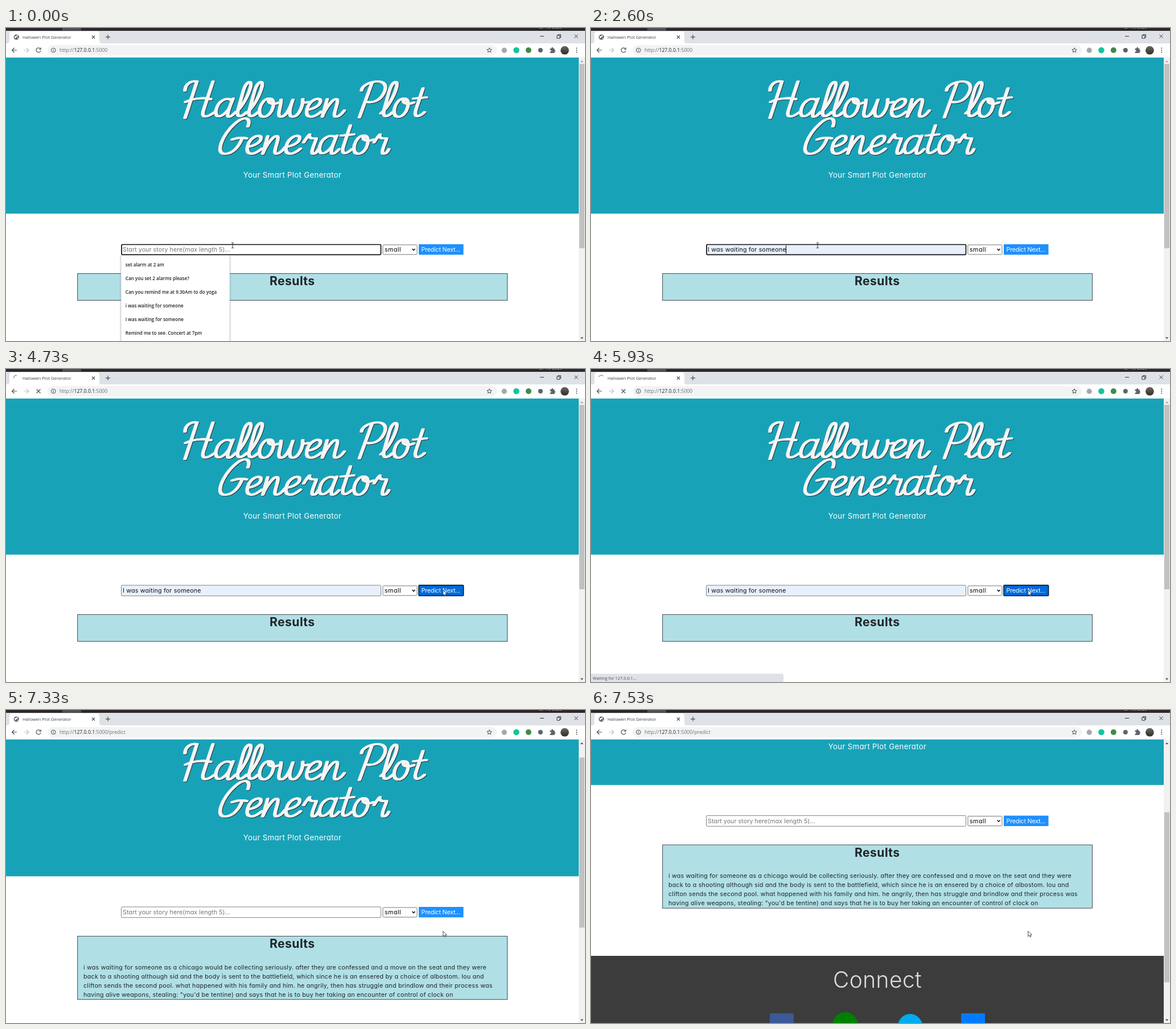
Animation, 1017 px wide and 550 px high, one loop 8000 ms. Source, as an HTML page:

```html
<!DOCTYPE html>
<html lang="en">
<head>
<meta charset="utf-8">
<title>Hallowen Plot Generator</title>
<style>
html, body { margin: 0; width: 100%; height: 100%; overflow: hidden; background: #fff; }
svg { display: block; width: 1017px; height: 550px; }
text { white-space: pre; }
.ui { font-family: "Open Sans", "Noto Sans", sans-serif; }
.web { font-family: Inter, Roboto, sans-serif; font-feature-settings: "cv11"; font-size: 10.7px; letter-spacing: .23px; fill: #212529; }
.list { font: 600 8.1px "Open Sans", "Noto Sans", sans-serif; fill: #222; }
.line { fill: none; stroke: #4a4d51; stroke-width: 1.2; }
.script { fill: none; stroke: #f5f5f5; stroke-width: 3.7; stroke-linecap: round; stroke-linejoin: round; filter: drop-shadow(1.3px 1.3px 0 #2b3d42); }
</style>
</head>
<body>
<svg viewBox="0 0 1017 550" xmlns="http://www.w3.org/2000/svg">
  <defs>
    <clipPath id="view"><rect y="51.5" width="1006" height="498.5"/></clipPath>
    <linearGradient id="face" x2="0" y2="1"><stop stop-color="#6b6a5c"/><stop offset="1" stop-color="#2f2b2a"/></linearGradient>
  </defs>
  <rect width="1017" height="550" fill="#fff"/>

  <g clip-path="url(#view)">
    <g id="page">
      <rect y="51.5" width="1006" height="274.7" fill="#18a2b8"/>
      <g id="title" class="script" role="img" aria-label="Hallowen Plot Generator"></g>
      <text class="web" x="503" y="263" text-anchor="middle" style="font-size:13.24px;letter-spacing:.32px;fill:#fff">Your Smart Plot Generator</text>

      <rect id="field" rx="1.5"/>
      <text id="value" class="web" x="205" y="393" xml:space="preserve"></text>
      <rect id="caret" y="382" width="1" height="14.5" fill="#000"/>

      <rect x="662" y="381" width="60" height="17" rx="1.5" fill="#fff" stroke="#767676"/>
      <text class="web" x="665" y="393" style="letter-spacing:.45px;fill:#000">small</text>
      <path d="M713.5 388l2.5 2.6 2.5-2.6" fill="none" stroke="#111" stroke-width="1.5"/>

      <rect id="ring" x="723.8" y="378.8" width="81" height="21" rx="2" fill="#8fc3f5"/>
      <rect id="button" x="725" y="380" width="78.5" height="18.4"/>
      <text class="web" x="729.5" y="393" style="letter-spacing:-.2px;fill:#fff">Predict Next...</text>

      <rect id="box" x="125.7" y="431.4" width="754.8" fill="#b0e0e6" stroke="#343a40" stroke-width=".9"/>
      <text class="web" x="502.8" y="452" text-anchor="middle" style="font-size:21.2px;letter-spacing:.4px;font-weight:700">Results</text>
      <g id="story" class="web"></g>

      <g id="footer">
        <rect y="626.4" width="1006" height="240" fill="#3c3c3c"/>
        <text class="web" x="503" y="682.8" text-anchor="middle" style="font-size:39px;font-weight:300;fill:#dcdcdc;letter-spacing:.4px">Connect</text>
        <rect x="314" y="727.5" width="42" height="42" rx="2" fill="#3b5998"/>
        <circle cx="446.5" cy="748" r="22.5" fill="#008000"/>
        <circle cx="560.5" cy="750" r="21.5" fill="#00acee"/>
        <rect x="650" y="727.5" width="42" height="42" rx="2" fill="#007bff"/>
      </g>
    </g>
    <g id="menu">
      <rect id="panel" x="202" y="399.5" fill="#fff" stroke="#d0d0d0" stroke-width=".7" rx="1" style="filter:drop-shadow(0 1px 1.5px #0005)"/>
      <rect id="mark" x="202.4" width="126.6" height="24" fill="#e8e8e8"/>
      <g id="items" class="list"></g>
    </g>
  </g>

  <rect x="1006" y="51.5" width="11" height="498.5" fill="#f1f1f1"/>
  <rect id="thumb" x="1007" width="9" fill="#c1c1c1"/>
  <path id="up" d="M1008.8 60h5.4l-2.7-3z"/>
  <path d="M1008.8 543.5h5.4l-2.7 3z" fill="#505050"/>

  <g class="ui">
    <rect width="1017" height="5" fill="#2d282c"/>
    <rect x="99" width="33" height="4.5" fill="#555054"/>
    <text x="937" y="1.2" font-size="7.6" fill="#ddd">27-10-2020</text>
    <rect y="5" width="1017" height="22" fill="#dee1e6"/>
    <path d="M2 27q4 0 4-4V11q0-5 5-5H159q5 0 5 5v12q0 4 4 4z" fill="#fff"/>
    <rect y="27" width="1017" height="24.5" fill="#fff"/>
    <g id="globe">
      <circle cx="18.3" cy="16" r="4.6" fill="#505458"/>
      <path d="M15 14l3 .3 1-2 2 1-1 2.3-2.5 1-.5 2.4-1.6-2zM20 17l2-.5-.8 2-1.6 1z" fill="#fff"/>
    </g>
    <path id="spin" fill="none" stroke-width="1.3" stroke-linecap="round"/>
    <text x="29" y="18.7" font-size="7.47" fill="#3c4043">Hallowen Plot Generator</text>
    <path class="line" d="M151 13.5l5 5m0-5l-5 5M175 15.8h8m-4-4v8"/>
    <path class="line" d="M938 14.5h7M967.8 13.2h5v5h-5zM969.4 13v-1.4h5v5h-1.4M998.5 11.5l6 6m0-6l-6 6" style="stroke:#222;stroke-width:.9"/>
    <path class="line" d="M19 39h-8.4m4-4l-4 4 4 4"/>
    <path class="line" d="M31.5 39h8.4m-4-4l4 4-4 4" style="stroke:#bdc1c6"/>
    <path id="reload" class="line" d="M60.2 36.4a4 4 0 1 0 .8 3.4M61.2 34.6v2.9h-3"/>
    <path id="stop" class="line" d="M53.5 35.5l7 7m0-7l-7 7"/>
    <rect x="73" y="30" width="789" height="18" rx="9" fill="#f1f3f4"/>
    <circle cx="83.3" cy="39" r="3.8" class="line" style="stroke-width:1"/>
    <path class="line" d="M83.3 38.5v2.6m0-4.2v1" style="stroke-width:1"/>
    <text x="94" y="42.2" font-size="8.68" fill="#6b7075" xml:space="preserve">http://<tspan fill="#202124">127.0.0.1</tspan>:5000<tspan id="path"></tspan></text>
    <path class="line" style="stroke-width:1" d="M849 34.8l1.2 2.8 3 .2-2.3 2 .7 2.9-2.6-1.6-2.6 1.6.7-2.9-2.3-2 3-.2z"/>
    <circle cx="875.2" cy="39.2" r="4.6" fill="#a4a8ac"/>
    <circle cx="896.4" cy="39" r="5.3" fill="#15c39a"/>
    <circle cx="917.8" cy="39" r="5" fill="#3f8a4a"/>
    <circle cx="938.8" cy="39" r="4" fill="#5f6368"/>
    <path d="M955.5 36h2.6a1.6 1.6 0 1 1 3 0h2.4v2.7a1.5 1.5 0 1 1 0 3V44h-8v-2.6a1.5 1.5 0 1 0 0-2.8z" fill="#5f6368"/>
    <circle cx="981.4" cy="39.2" r="7.4" fill="url(#face)"/>
    <g fill="#4a4d51"><circle cx="1002.3" cy="35.6" r="1"/><circle cx="1002.3" cy="39" r="1"/><circle cx="1002.3" cy="42.4" r="1"/></g>
    <g id="status">
      <path d="M0 535.5h335q3 0 3 3V550H0z" fill="#dee1e6"/>
      <text x="3" y="546" font-size="7.4" fill="#4a4d51">Waiting for 127.0.0.1...</text>
    </g>
  </g>

  <path id="beam" d="M-2-4.5h1.4L0-4l.6-.5H2M0-4v8M-2 4.5h1.4L0 4l.6.5H2" fill="none" stroke="#222" stroke-width=".9"/>
  <path id="arrow" d="M0 0v9.3l2.1-1.9 1.5 3.2 1.5-.7-1.4-3.1h2.9z" fill="#fff" stroke="#222" stroke-width=".8"/>
</svg>
<script>
const LOOP = 8000, FPS = 15;
const $ = id => document.getElementById(id);
const NS = 'http://www.w3.org/2000/svg';

function add(parent, tag, attrs, text) {
  const el = document.createElementNS(NS, tag);
  set(el, attrs);
  if (text) el.textContent = text;
  parent.append(el);
  return el;
}
function set(el, attrs) {
  for (const k in attrs) el.setAttribute(k, attrs[k]);
}
const show = (id, on) => { $(id).style.display = on ? '' : 'none'; };

// Upright pen strokes, baseline at 0; the slant is added by skewX.
const glyphs = {
  H: 'M-9-46C-12-58-2-64 8-62L3 2M36-62L32-12C31 2 40 3 52-8M-3-26C10-33 28-34 40-31',
  P: 'M10-60L3 1M-5-46C-8-62 38-72 36-46C34-28 20-24 10-26',
  G: 'M39-48C41-66 26-66 14-52C-2-34-8 1 11 0C24 0 32-12 34-27M17-25C24-28 34-29 42-27',
  a: 'M26-28C20-35 3-32 2-14C2 3 15 4 24-14L27-32C24-14 22 0 28 0C32 0 34-4 37-8',
  l: 'M0-6C10-16 16-38 16-52C16-66 6-64 5-46L4-14C4 2 12 2 20-8',
  o: 'M14-32C-2-32-2 0 12 0C28 0 28-32 14-32C12-24 22-20 33-25',
  w: 'M2-30C6-20 0 0 10 0C18 0 22-16 23-30C21-14 22 0 30 0C40 0 44-18 40-31C40-24 46-24 51-26',
  e: 'M2-12C14-14 24-20 22-28C19-36 2-30 2-14C2 3 16 4 28-9',
  n: 'M4-31L3 0C5-16 14-32 20-31C28-30 18 0 27 0C32 0 36-5 39-11',
  r: 'M2-20C4-26 8-34 9-34C8-28 14-26 22-27C24-26 16 0 24 0C28 0 30-4 31-8',
  t: 'M10-50L7-14C6 2 14 2 23-8M-2-32L20-34'
};
const advance = { H: 52, P: 39, G: 45, a: 36.5, l: 20, o: 33, w: 50, e: 29, n: 39, r: 30, t: 24 };
// A broad nib: the stroke repeats sideways, so stems are thicker than hairlines.
const nib = [-1.4, 0, 1.4];
for (const [word, left, base] of [['Hallowen', 312, 156], ['Plot', 618, 156], ['Generator', 374, 221]]) {
  let x = left;
  for (const c of word) {
    for (const dx of nib) add($('title'), 'path', { d: glyphs[c], transform: `translate(${x + dx} ${base}) skewX(-14)` });
    x += advance[c];
  }
}

[
  'i was waiting for someone as a chicago would be collecting seriously. after they are confessed and a move on the seat and they were',
  'back to a shooting although sid and the body is sent to the battlefield, which since he is an ensered by a choice of albostom. lou and',
  'clifton sends the second pool. what happened with his family and him. he angrily, then has struggle and brindlow and their process was',
  'having alive weapons, stealing: "you\'d be tentine) and says that he is to buy her taking an encounter of control of clock on'
].forEach((s, i) => add($('story'), 'text', { x: 136, y: 489.8 + i * 15.9 }, s));

const hits = ['i was waiting for someone', 'I was waiting for someone', 'I was waiting for my'];
const lists = {
  all: [191, ['set alarm at 2 am', 'Can you set 2 alarms please?', 'Can you remind me at 9.30Am to do yoga',
    hits[0], hits[1], 'Remind me to see. Concert at 7pm', hits[2]]],
  some: [160, [...hits, 'I want to set an alarm at 7 am', 'i will go there']],
  few: [127, hits],
  none: [0, []]
};

// [tick, text, list, caret, highlighted row]
const typing = [
  [0, '', 'all', 0, -1], [1, 'I', 'all', 1, -1], [2, 'I', 'some', 1, -1], [4, 'I ', 'some', 1, -1],
  [8, 'I w', 'some', 1, -1], [10, 'I wa', 'few', 1, -1], [13, 'I was ', 'few', 1, -1],
  [21, 'I was ', 'few', 0, -1], [29, hits[0], 'few', 0, 0], [32, hits[1], 'few', 0, 1],
  [39, hits[1], 'none', 1, -1], [47, hits[1], 'none', 0, -1], [93, '', 'none', 0, -1]
];
// [tick, x, y]
const pointer = [[46, 398, 382], [48, 520, 360], [49, 690, 332], [50, 786, 322], [52, 786, 322],
  [55, 782, 345], [58, 773, 376], [61, 767.7, 388.5]];
const scrolls = [[107, 0], [108, 3], [109, 13], [110, 34], [111, 80], [112, 142], [113, 194.4]];

const last = (table, k) => table.filter(r => r[0] <= k).pop() || table[0];
function along(table, k) {
  const a = last(table, k), b = table[table.indexOf(a) + 1];
  if (!b || k <= a[0]) return a.slice(1);
  const f = (k - a[0]) / (b[0] - a[0]);
  return a.slice(1).map((v, i) => v + (b[i + 1] - v) * f);
}

function arc(from, sweep) {
  const pt = deg => {
    const r = deg * Math.PI / 180;
    return `${(18.2 + 4.7 * Math.cos(r)).toFixed(2)} ${(15.8 + 4.7 * Math.sin(r)).toFixed(2)}`;
  };
  return `M${pt(from)}A4.7 4.7 0 0 1 ${pt(from + sweep)}`;
}

let openList;
function drawMenu(name, row) {
  const [w, rows] = lists[name];
  show('menu', rows.length);
  show('mark', row >= 0);
  set($('mark'), { y: 404 + 24 * row });
  if (name === openList) return;
  openList = name;
  set($('panel'), { width: w, height: rows.length * 24 + 10 });
  $('items').replaceChildren();
  rows.forEach((s, i) => add($('items'), 'text', { x: 209.8, y: 419 + 24 * i }, s));
}

function draw(k) {
  const done = k >= 93, focus = k < 63, pressed = k >= 63 && !done;
  const loading = k >= 67 && k < 104, blue = k >= 102;

  const [, text, list, caret, row] = last(typing, k);
  const value = $('value');
  value.textContent = text || 'Start your story here(max length 5)...';
  value.style.fill = text ? '#111' : '#757575';
  value.style.letterSpacing = text ? '.19px' : '.05px';
  show('caret', caret);
  if (caret) set($('caret'), { x: 204.4 + value.getComputedTextLength() });
  drawMenu(list, row);

  set($('field'), {
    x: focus ? 203 : 202.5, y: focus ? 380.5 : 380, width: focus ? 455.5 : 456, height: focus ? 17.8 : 18.7,
    stroke: focus ? '#101010' : '#767676', 'stroke-width': focus ? 1.7 : .9,
    fill: k >= 29 && !done ? '#e8f0fe' : '#fff'
  });
  show('ring', pressed);
  set($('button'), {
    fill: pressed ? '#0069d9' : '#1e90ff', stroke: pressed ? '#101010' : 'none',
    'stroke-width': 1.3, rx: pressed ? 1.5 : 0
  });

  const [scroll] = along(scrolls, k);
  set($('page'), { transform: `translate(0 ${-scroll})` });
  set($('box'), { height: done ? 111.2 : 47.2 });
  show('story', done);
  show('footer', done);
  set($('thumb'), { y: 63 + scroll * .6, height: done ? 299 : 324 });
  set($('up'), { fill: scroll ? '#505050' : '#a3a3a3' });

  show('globe', !loading);
  show('spin', loading);
  show('reload', !loading);
  show('stop', loading);
  show('status', k >= 80 && k < 107);
  $('path').textContent = done ? '/predict' : '';
  set($('spin'), blue
    ? { d: arc(45, 5 + (k - 102) * 45), stroke: '#1a73e8' }
    : { d: arc(180 - (k - 71) * 18.2, 95), stroke: '#8a8f94' });

  const [x, y] = along(pointer, k), beam = k < 48;
  show('beam', beam);
  show('arrow', !beam);
  set($(beam ? 'beam' : 'arrow'), { transform: `translate(${x} ${y})` });
}

const start = performance.now();
let shown = -1;
function frame() {
  const t = (performance.now() - start) % LOOP;
  const k = Math.floor((t + 4) * FPS / 1000) % (LOOP * FPS / 1000);
  if (k !== shown) draw(shown = k);
  requestAnimationFrame(frame);
}
frame();
</script>
</body>
</html>
```
